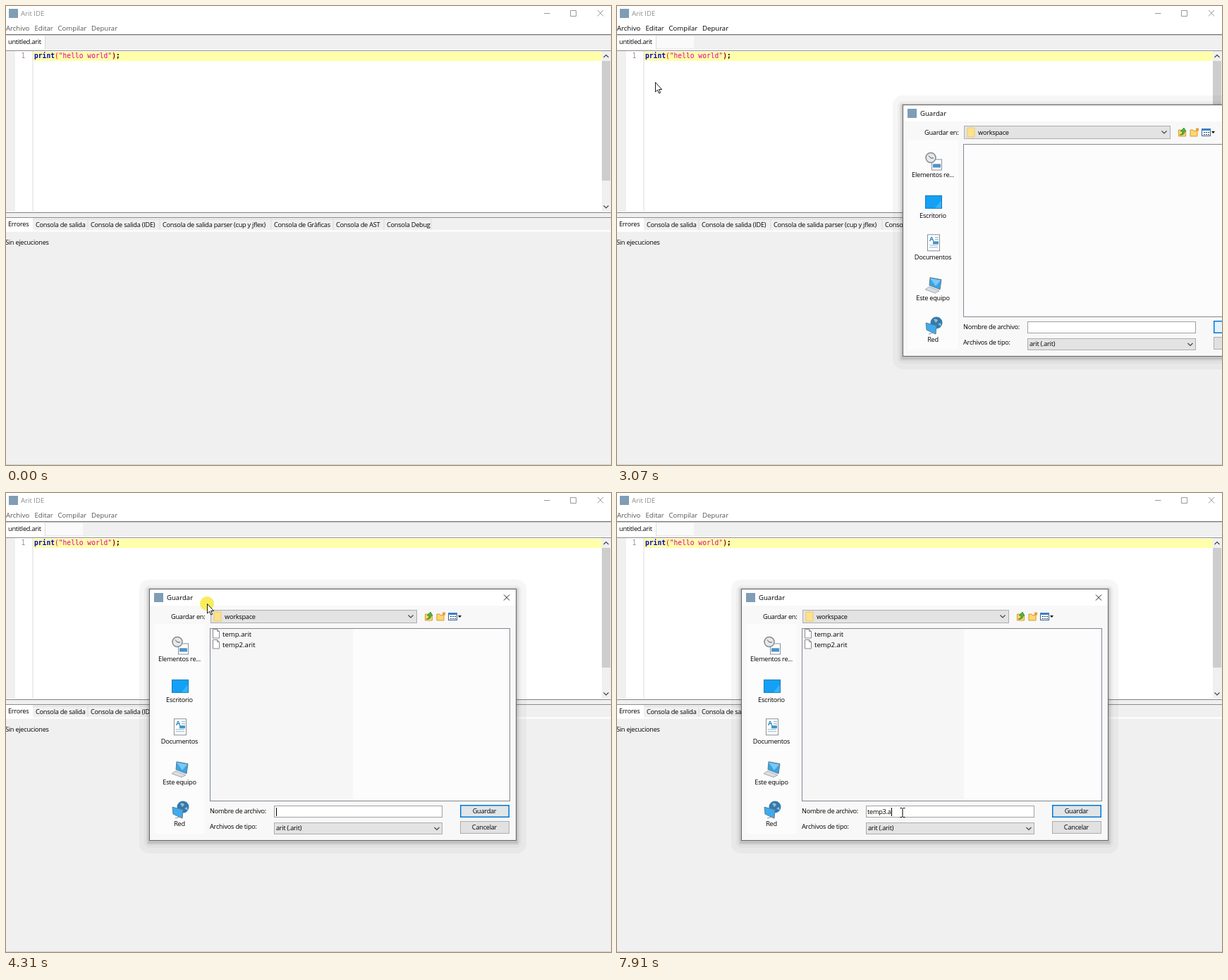
An HTML page that plays this animation: 858 px wide and 652 px high, repeating every 8 s.

```html
<!DOCTYPE html>
<html lang="es">
<head>
<meta charset="utf-8">
<title>Arit IDE</title>
<style>
html, body { margin: 0; width: 100%; height: 100%; overflow: hidden; background: #f0f0f0; }
svg { display: block; width: 858px; height: 652px; }
text { font-family: "Open Sans", "Noto Sans", sans-serif; white-space: pre; }
.ui { font-size: 9.6px; }
.sm { font-size: 9.2px; letter-spacing: -.25px; }
.code { font: 9.65px "DejaVu Sans Mono", monospace; }
.b { font-weight: bold; }
.mid { text-anchor: middle; }
</style>
</head>
<body>
<svg id="stage" viewBox="0 0 858 652" xmlns="http://www.w3.org/2000/svg"></svg>
<script>
const TICK = 76.7, LOOP = 8000;

// Markup helpers
const rect = (x, y, w, h, fill, more = '') =>
  `<rect x="${x}" y="${y}" width="${w}" height="${h}" fill="${fill}" ${more}/>`;
const box = (x, y, w, h, fill, line) =>
  rect(x + .5, y + .5, w - 1, h - 1, fill, `stroke="${line}"`);
const path = (d, line, fill = 'none', more = '') =>
  `<path d="${d}" stroke="${line}" fill="${fill}" ${more}/>`;
// y is the middle of the line of text
const text = (x, y, s, cls = 'sm', fill = '#000', more = '') =>
  `<text x="${x}" y="${y + 3.4}" class="${cls}" fill="${fill}" ${more}>${s}</text>`;
const group = (id, inner) => `<g id="${id}">${inner}</g>`;
const badge = (x, y) => rect(x, y, 13, 13, '#7f9db5');
const chevron = (x, y, dir = 1) =>
  path(`M${x - 3.5} ${y - 2 * dir}l3.5 ${3.5 * dir} 3.5 ${-3.5 * dir}`, '#444', 'none', 'stroke-width="1.2"');

function mainWindow() {
  const tabs = [['Consola de salida', 38, 78], ['Consola de salida (IDE)', 116, 102],
    ['Consola de salida parser (cup y jflex)', 218, 158], ['Consola de Gràficas', 376, 88],
    ['Consola de AST', 464, 72], ['Consola Debug', 536, 67]];
  const menus = [['Archivo', 0], ['Editar', 40.5], ['Compilar', 73.5], ['Depurar', 121]];
  const code = '<tspan class="b" fill="#0000c8">print</tspan><tspan fill="#f00">(</tspan>' +
    '<tspan fill="#dc009c">"hello world"</tspan><tspan class="b" fill="#a00000">)</tspan>' +
    '<tspan class="b">;</tspan>';
  return rect(0, 0, 858, 40, '#fff') + badge(4, 4) +
    group('title', text(21, 10.5, 'Arit IDE', 'ui', 'inherit')) +
    group('controls', path('M763 10.5h8.5M800.5 6.5h8v8h-8zM839 6l8 8.5M847 6l-8 8.5', 'inherit')) +
    rect(0, 23, 37.5, 17, '#cce8ff', 'id="hot" stroke="#99d1ff"') +
    group('menubar', menus.map(m => text(m[1], 31.5, m[0], 'ui', 'inherit')).join('')) +
    rect(0, 40, 858, 1, '#777') + rect(0, 41, 858, 1, '#c8c8c8') + rect(0, 42, 858, 21, '#f0f0f0') +
    rect(56, 43, 53, 17, '#fafafa', 'id="patch"') +
    rect(0, 42, 55, 20, '#fff') + rect(55, 43, 1, 18, '#d9d9d9') +
    text(3, 51, 'untitled.arit') +
    rect(0, 62, 858, 1, '#fff') + rect(0, 63, 858, 1, '#8c8c8c') +
    rect(0, 64, 858, 229, '#fff') + rect(0, 64, 13, 228, '#f0f0f0') +
    rect(38, 65, 807, 13, '#ffffaa') + rect(37.5, 64, 1, 228, '#dcdcdc') +
    text(21.5, 71, '1', 'code', '#a88') + text(40, 71, code, 'code') +
    rect(845, 64, 13, 228, '#f0f0f0') + rect(845, 78, 12, 170, '#cdcdcd') +
    chevron(851, 71, -1) + chevron(851, 285.5) +
    rect(0, 293, 858, 1, '#828282') + rect(0, 294, 858, 6, '#f0f0f0') +
    rect(0, 300, 858, 1, '#8c8c8c') + rect(0, 301, 858, 349, '#f0f0f0') +
    rect(0, 318, 858, 3, '#fbfbfb') +
    tabs.map(t => rect(t[1] + t[2] - .5, 303, 1, 15, '#d9d9d9') +
      text(t[1] + 4, 311, t[0])).join('') +
    rect(38, 302.5, 565, 1, '#dedede') + rect(0, 301, 38, 19, '#fff') +
    text(3, 310, 'Errores') + text(-1, 335.5, 'Sin ejecuciones') +
    rect(0, 651, 858, 1, '#d0d0d0');
}

const rowTop = i => 42 + 18.4 * i;
function popup() {
  const items = ['Nuevo archivo', 'Cerrar pestaña', 'Abrir', 'Guardar', 'Guardar como...', 'Salir'];
  return box(-1, 40, 110, 114, '#f2f2f2', '#a0a0a0') +
    rect(0, 0, 107, 18.4, '#91c9f7', 'id="hover"') +
    items.map((s, i) => text(25, rowTop(i) + 9.6, s, 'ui')).join('');
}

// Icons of the places bar, centred on 0,0
const sheet = (x, y, w, h) => box(x, y, w, h, '#fff', '#8a9096') +
  path(`M${x + 3} ${y + h - 8.5}h${w - 6}M${x + 3} ${y + h - 5.5}h${w - 6}`, '#8fb4d0');
const screen = path('M-5 -10L11 -7 9 7 -6 1Z', '#6c7a84', '#36a5ea') +
  path('M-5 -9L10 -6 3 2Z', 'none', '#7cc8f5');
const places = [
  ['Elementos re...', sheet(-3, -3, 15, 16) + rect(-1, 4, 11, 5, '#4d93c9') +
    '<circle cx="-4" cy="-5" r="7" fill="#e6e8ea" stroke="#858b90" stroke-width="1.5"/>' +
    path('M-7 -8l3 3.5h4', '#555')],
  ['Escritorio', box(-12, -10, 24, 19, '#14a0f5', '#1479b8') + path('M11 8L2 8 11 -3Z', 'none', '#35b4fb')],
  ['Documentos', sheet(-9, -13, 18, 24) + text(-6, -7, 'A', 'sm b', '#2484c2') +
    path('M2 -8.5h5M2 -5.5h5', '#7aa7c7') + rect(-1, -3, 8, 4, '#3f93c4')],
  ['Este equipo', screen + path('M-12 7L-6 3 8 9 2 12Z', '#a4abb0', '#d9dee2')],
  ['Red', '<circle cx="4" cy="-4" r="8.5" fill="#3579ac"/>' +
    path('M0 -9q5 -2 6 2l-3 3zM6 -2l4 -2 1 5z', 'none', '#8ec1cf') +
    path('M-11 -4L4 0 3 12 -10 6Z', '#5f7f94', '#3eabef') + path('M-7 12L2 9', '#8b9499')]
];
const folder = (x, y) => path(`M${x} ${y}h4l1 1.5h5v7.5h-10z`, '#d59b33', '#ffd873');

function dialog() {
  const halo = [[14, 13, 18, .035], [7, 5, 10, .03], [4, 2, 6, .06], [2, 1, 4, .09]].map(([s, t, b, o]) =>
    rect(-s, -t, 521 + 2 * s, 358 + t + b, '#000', `rx="${s}" opacity="${o}"`)).join('');
  const file = (y, s) => path(`M90.5 ${y - 6.5}h6l3 3v9.5h-9z`, '#8a8a8a', '#fff') +
    path(`M96.5 ${y - 6.5}v3h3`, '#8a8a8a') + text(104, y + .5, s, 'ui');
  return halo + box(0, 0, 521, 358, '#f8f8f8', '#666') + rect(1, 1, 519, 23, '#fff') +
    rect(8, 50, 71, 298, '#fcfcfc') +
    badge(7, 6) + text(25, 13, 'Guardar', 'ui') + path('M503 8.5l8 8M511 8.5l-8 8', '#222') +
    text(31, 39.5, 'Guardar en:') + box(87, 30, 293, 19, '#e3e3e3', '#adadad') +
    rect(92, 33, 10, 13, '#ffe28a', 'stroke="#e6bf57" stroke-width=".7"') +
    text(107, 39.5, 'workspace') + chevron(371, 39.5) +
    folder(391.5, 36) + path('M393 43q4 0 4 -5h-3l5 -5 3 5h-2q0 6 -7 5z', '#2a7d1f', '#52b53b', 'stroke-width=".7"') +
    folder(408, 36) + rect(416, 33.5, 4, 4, '#f39a35') +
    box(424, 34, 13, 11, '#fff', '#2a63a8') + rect(424, 34, 13, 3, '#3b7fc9') +
    path('M427 39.5h8M427 42.5h8', '#333', 'none', 'stroke-dasharray="2 1"') +
    path('M438 38h5l-2.5 3z', 'none', '#000') +
    box(86, 56, 426, 246, '#fcfcfc', '#828790') + rect(87, 57, 0, 244, '#f6f6f6', 'id="shade"') +
    group('files', file(64, 'temp.arit') + file(79, 'temp2.arit')) +
    places.map(([s, icon], i) => `<g transform="translate(44 ${80.5 + i * 58.4})">${icon}</g>` +
      text(43, 99.5 + i * 58.4, s, 'sm mid')).join('') +
    text(86, 316, 'Nombre de archivo:') + box(177, 308, 239, 17, '#fff', '#a0a0a0') +
    text(179, 317, '', 'sm', '#000', 'id="typed"') + rect(0, 311, 1, 12, '#000', 'id="caret"') +
    text(86, 338, 'Archivos de tipo:') + box(177, 332, 239, 17, '#e3e3e3', '#adadad') +
    text(180, 340, 'arit (.arit)') + chevron(408, 341) +
    rect(441.75, 307.75, 68.5, 16.5, '#e1e1e1', 'id="ok" stroke="#0078d7" stroke-width="1.5"') +
    text(475.5, 316, 'Guardar', 'sm mid') +
    box(441, 330, 70, 18, '#e1e1e1', '#adadad') + text(475.5, 338.5, 'Cancelar', 'sm mid');
}

const pointer = '<circle id="press" r="10" fill="#f7ea3c" opacity=".85"/>' +
  path('M.5 .5V14L3.6 11.2 5.6 16 7.6 15.1 5.6 10.5H9.6Z', '#000', '#fff', 'id="arrow" stroke-width=".9"') +
  path('M-3.5 -6.5h2.5l1 1 1 -1h2.5M0 -5.5v11M-3.5 6.5h2.5l1 -1 1 1h2.5', '#000', 'none', 'id="ibeam"');

document.getElementById('stage').innerHTML = mainWindow() + group('popup', popup()) +
  group('dialog', dialog()) + group('pointer', pointer);

const $ = id => document.getElementById(id);
const set = (id, name, v) => $(id).setAttribute(name, v);
const show = (id, on) => set(id, 'visibility', on ? 'inherit' : 'hidden');
const move = (id, [x, y]) => set(id, 'transform', `translate(${x} ${y})`);

// Linear travel through [time, x, y] points
function along(keys, t) {
  const i = keys.findIndex(k => k[0] > t);
  if (i < 0) return keys[keys.length - 1].slice(1);
  if (!i) return keys[0].slice(1);
  const a = keys[i - 1], b = keys[i], p = (t - a[0]) / (b[0] - a[0]);
  return [1, 2].map(n => Math.round(a[n] + (b[n] - a[n]) * p));
}

const cursorKeys = [
  [380, 287, 337], [455, 133, 166], [900, 84, 58], [1200, 30, 36], [1450, 21, 31], [1690, 21, 31],
  [1990, 43, 77], [2450, 47, 101], [2600, 49, 107], [3060, 49, 107], [3740, 488, 162], [3840, 488, 162]];
const dragKeys = [[3835, 405, 140], [3910, 361, 131], [4100, 268, 134], [4292, 203, 136], [4500, 182, 136], [4670, 176, 136]];
const dropKeys = [
  [4700, 258, 157], [4980, 380, 343], [5060, 403, 371], [5140, 410, 383], [5210, 413, 407],
  [5290, 401, 462], [6050, 401, 462], [6440, 405, 456], [6600, 405, 457], [6820, 405, 454]];
const keyTimes = [6600, 6675, 6825, 6980, 7660, 7820, 7890];
const word = 'temp3.a';

function draw(time) {
  const t = Math.floor((time + 12) / TICK) * TICK;
  const active = t > 1060 && t < 3060, saving = t > 3060;
  set('title', 'fill', active ? '#000' : '#8c8c8c');
  set('controls', 'stroke', active ? '#111' : '#999');
  set('menubar', 'fill', t > 1060 && t < 3130 ? '#000' : '#555');
  show('hot', t > 1130 && t < 3060);
  show('patch', saving);
  show('popup', t > 1280 && t < 3060);

  const at = along(dragKeys, t);
  const dragging = t > 3900 && t < 4700;
  const tip = dragging ? [at[0] + 82, at[1] + 21] : along(t < 4700 ? cursorKeys : dropKeys, t);
  const beam = t < 690 || t > 6100;
  show('pointer', t > 370 && (t < 680 || t > 900));
  show('press', t > 3740 && t < 4700);
  show('arrow', !beam);
  show('ibeam', beam);
  move('pointer', tip);

  const row = Math.floor((tip[1] - rowTop(0)) / 18.4);
  show('hover', row >= 0);
  set('hover', 'y', rowTop(Math.max(row, 0)));

  show('dialog', saving);
  move('dialog', at);
  show('files', t > 3200);
  set('shade', 'width', t > 3900 ? Math.max(0, 492 - at[0] - 87) : 0);
  const count = keyTimes.filter(k => k <= t).length;
  $('typed').textContent = word.slice(0, count);
  set('caret', 'x', Math.round(179.5 + (count ? $('typed').getComputedTextLength() : 0)));
  const blink = t < 6600 ? t > 4090 && Math.floor((t - 4090) / 500) % 2 === 0 : t < 7360 || t > 7510;
  show('caret', saving && blink);
  const glow = .5 + .5 * Math.cos((t - 3070) / 2000 * 2 * Math.PI);
  set('ok', 'fill', `rgb(${225 + 4 * glow},${228 + 13 * glow},${231 + 20 * glow})`);
}

const start = performance.now();
function frame() {
  draw((performance.now() - start) % LOOP);
  requestAnimationFrame(frame);
}
frame();
</script>
</body>
</html>
```
